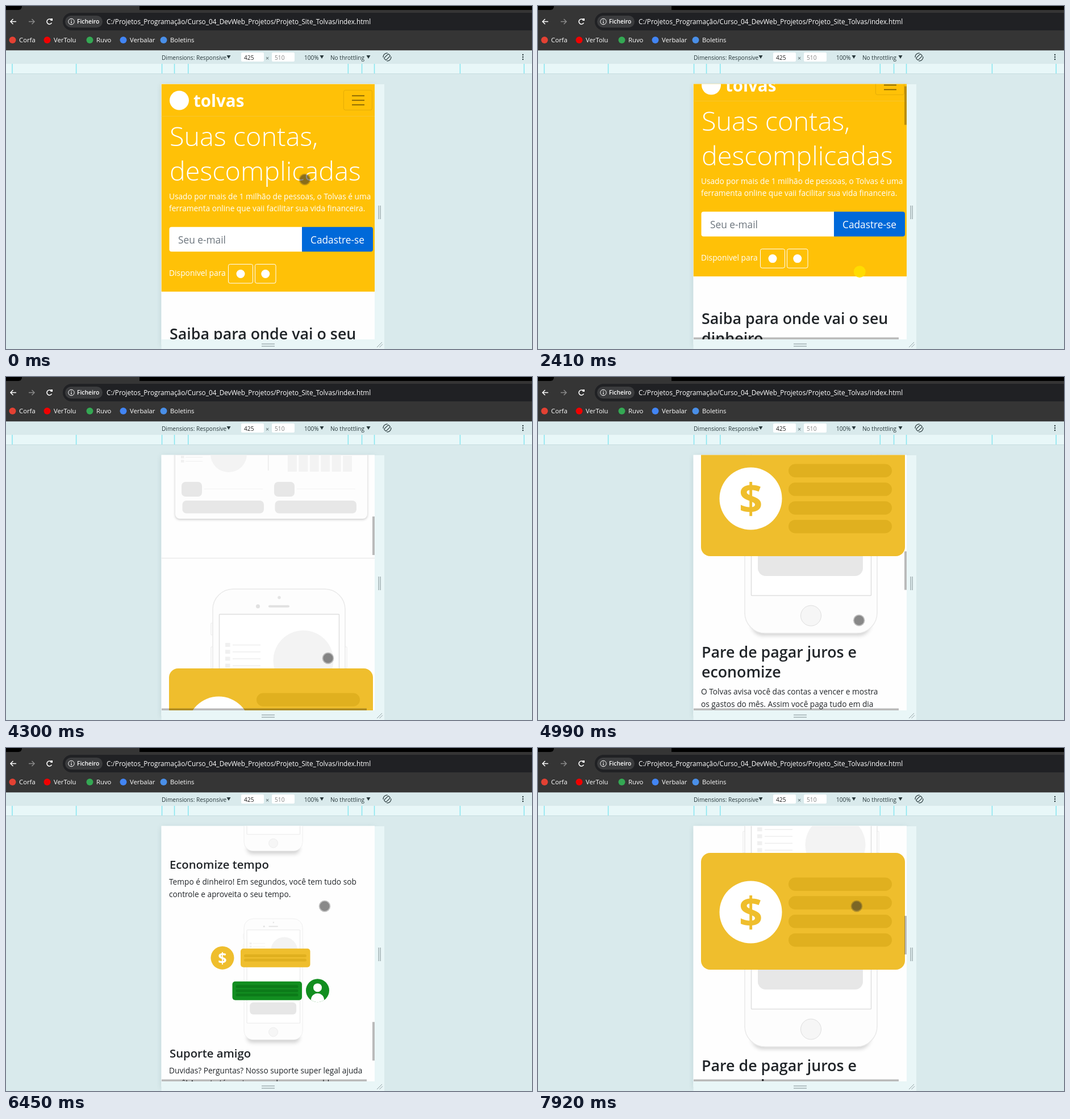
Animation, 926 px wide and 605 px high, one loop 8 s. Source, as an HTML page with a canvas:

```html
<!DOCTYPE html>
<html lang="pt">
<head>
<meta charset="utf-8">
<title>Tolvas</title>
<style>
html, body { margin: 0; width: 100%; height: 100%; overflow: hidden; }
canvas { display: block; width: 926px; height: 605px; }
</style>
</head>
<body>
<canvas id="stage" width="926" height="605"></canvas>
<script>
const ctx = document.getElementById('stage').getContext('2d');
const LOOP = 8000, TAU = Math.PI * 2;
const FAMILY = '"Open Sans", "Noto Sans", sans-serif';
const GOLD = '#efbe2d', GOLD_DARK = '#e0b01f', BLUE = '#007bff', INK = '#212529';
const VIEW = { x: 273.5, y: 137.5, w: 375.5, h: 450.5 };

// Each swipe drags the finger for DRAG ms; the page coasts until GLIDE ms.
const DRAG = 200, GLIDE = 700;
const LOW = { x: 567, y: 496 }, HIGH = { x: 561, y: 279 };
const swipe = (start, scroll, from = LOW, to = HIGH) => ({ start, scroll, from, to });
const SWIPES = [
  swipe(2340, 358), swipe(3600, 713), swipe(4380, 1120), swipe(5130, 1584), swipe(6070, 2490),
  swipe(7210, 1042, { x: 575, y: 387 }, { x: 572, y: 596 })
];

const clamp = v => Math.max(0, Math.min(1, v));
const smooth = p => p * p * (3 - 2 * p);
const accelerate = p => p * p;
const coast = p => 1 - (1 - p ** 1.6) ** 3;

const REST = { x: 526, y: 306 };
const move = (start, end, to, ease = smooth) => ({ start, end, to, ease });
const MOVES = [
  move(560, 720, { x: 526, y: 352 }), move(960, 1200, { x: 529, y: 386 }), move(1640, 2260, LOW),
  ...SWIPES.flatMap((s, i) => {
    const next = SWIPES[i + 1] || { start: LOOP, from: HIGH };
    return [
      move(s.start, s.start + DRAG, s.to, accelerate),
      move(next.start - 240, next.start - 80, next.from)
    ];
  })
];

function scrollAt(t) {
  return SWIPES.reduce((y, s) => y + (s.scroll - y) * coast(clamp((t - s.start) / GLIDE)), 0);
}
function pointerAt(t) {
  return MOVES.reduce((at, m) => {
    const e = m.ease(clamp((t - m.start) / (m.end - m.start)));
    return { x: at.x + (m.to.x - at.x) * e, y: at.y + (m.to.y - at.y) * e };
  }, REST);
}

function rect(x, y, w, h, fill) {
  ctx.fillStyle = fill;
  ctx.fillRect(x, y, w, h);
}
function round(x, y, w, h, r, fill, stroke, line = 1) {
  ctx.beginPath();
  ctx.roundRect(x, y, w, h, r);
  if (fill) { ctx.fillStyle = fill; ctx.fill(); }
  if (stroke) { ctx.strokeStyle = stroke; ctx.lineWidth = line; ctx.stroke(); }
}
function disc(x, y, r, fill, stroke) {
  ctx.beginPath();
  ctx.arc(x, y, r, 0, TAU);
  if (fill) { ctx.fillStyle = fill; ctx.fill(); }
  if (stroke) { ctx.strokeStyle = stroke; ctx.lineWidth = 1; ctx.stroke(); }
}
function path(points, color, width = 1) {
  ctx.beginPath();
  points.forEach(([x, y]) => ctx.lineTo(x, y));
  ctx.strokeStyle = color;
  ctx.lineWidth = width;
  ctx.stroke();
}
function text(s, x, y, size, fill, weight = 400, align = 'left') {
  ctx.font = `${weight} ${size}px ${FAMILY}`;
  ctx.textAlign = align;
  ctx.fillStyle = fill;
  ctx.fillText(s, x, y);
}
function lines(list, x, y, step, size, fill, weight) {
  list.forEach((s, i) => text(s, x, y + i * step, size, fill, weight));
}
function times(n, draw) {
  for (let i = 0; i < n; i++) draw(i);
}
function at(x, y, scale, draw) {
  ctx.save();
  ctx.translate(x, y);
  ctx.scale(scale, scale);
  draw();
  ctx.restore();
}
function shadowed(color, blur, dy, draw) {
  ctx.save();
  ctx.shadowColor = color;
  ctx.shadowBlur = blur;
  ctx.shadowOffsetY = dy;
  draw();
  ctx.restore();
}
function dollar(x, y, size, fill) {
  text('$', x, y + size * 0.357, size, fill, 700, 'center');
}

function navArrow(x, side, color) {
  path([[x - 5, 27.5], [x + 5, 27.5]], color, 1.5);
  path([[x + side * 0.5, 23], [x + side * 5, 27.5], [x + side * 0.5, 32]], color, 1.5);
}
function bookmark(name, x, color) {
  disc(x - 11.5, 60, 6, color);
  text(name, x, 64, 11.3, '#fff');
}

function browser() {
  rect(0, 0, 926, 78.5, '#353535');
  rect(235, 0, 691, 7, '#000');
  round(-10, -8, 38, 15, 6, '#000');
  round(100, 12, 840, 31, 15.5, '#202124');
  round(104, 17, 66, 21, 10.5, '#3b3c3e');

  navArrow(13, -1, '#fff');
  navArrow(45, 1, '#8a8a8a');
  ctx.beginPath();
  ctx.arc(76.5, 27.5, 4.5, 0.5, TAU - 0.7);
  ctx.strokeStyle = '#fff';
  ctx.lineWidth = 1.6;
  ctx.stroke();
  rect(78.5, 22, 3.5, 4, '#fff');

  disc(115, 27.5, 5.2, null, '#fff');
  rect(114.4, 24.5, 1.3, 1.4, '#fff');
  rect(114.4, 27, 1.3, 3.6, '#fff');
  text('Ficheiro', 125, 31, 10.3, '#fff', 600);
  text('C:/Projetos_Programação/Curso_04_DevWeb_Projetos/Projeto_Site_Tolvas/index.html', 177, 31.5, 11.75, '#fff');

  bookmark('Corfa', 23, '#e34133');
  bookmark('VerTolu', 84, '#f00000');
  bookmark('Ruvo', 159, '#34a853');
  bookmark('Verbalar', 218, '#4285f4');
  bookmark('Boletins', 289, '#4a8fe8');
}

function dropdown(s, x, arrowX, color) {
  text(s, x, 94.5, 10.1, color);
  ctx.beginPath();
  ctx.moveTo(arrowX - 3.5, 87);
  ctx.lineTo(arrowX + 3.5, 87);
  ctx.lineTo(arrowX, 93);
  ctx.fill();
}

function devTools() {
  const dark = '#28383b', grip = '#91a0a3';
  rect(0, 78.5, 926, 527, '#d9eaec');
  rect(0, 102, 926, 17, '#e8f7f8');
  rect(0, 119, 926, 1, '#c6dde0');
  // Common device widths, mirrored around the viewport centre
  for (const width of [320, 375, 425, 768, 1024])
    for (const side of [-1, 1]) rect(460.8 + side * width * 0.44, 102, 1.5, 17, '#86e6f0');

  dropdown('Dimensions: Responsive', 274, 392, dark);
  dropdown('100%', 525, 556, dark);
  dropdown('No throttling', 571, 638, dark);
  round(414, 82, 40, 16, 2, '#fff');
  round(468, 82, 40, 16, 2, '#fff');
  text('425', 419, 94.5, 10.2, '#222');
  text('510', 473, 94.5, 10.2, '#858585');
  text('×', 457, 95.5, 11, '#536366');

  at(671, 90, 1, () => {
    ctx.rotate(Math.PI / 4);
    round(-2.5, -5.5, 5, 11, 1, null, dark, 1.2);
    times(2, i => {
      ctx.beginPath();
      ctx.arc(0, 0, 7, i * Math.PI - 0.9, i * Math.PI + 0.9);
      ctx.stroke();
    });
  });
  times(3, i => disc(910, 86 + i * 4, 1.2, dark));

  shadowed('rgba(80,120,125,.25)', 9, 2, () => rect(VIEW.x, VIEW.y, VIEW.w, 460, '#fff'));
  rect(649, 138, 17, 467, '#e9f6f7');
  rect(VIEW.x, 588, 392.5, 17, '#e9f6f7');
  times(2, i => {
    rect(655.5 + i * 3, 352, 1.2, 24, grip);
    rect(450, 595.5 + i * 4, 23, 1.2, grip);
  });
  path([[653, 602], [662, 593]], grip);
  path([[657.5, 602], [663, 596.5]], grip);
}

function storeButton(x, w) {
  round(x, 455.5, w, 33.5, 3, null, '#fff');
  disc(x + w / 2, 472.5, 7.5, '#fff');
}

function hero() {
  rect(VIEW.x, VIEW.y, VIEW.w, 366.3, '#ffc107');
  rect(VIEW.x, 194, VIEW.w, 1, '#f7c52f');
  disc(305, 166.5, 17, '#fff');
  text('tolvas', 330, 178, 29.5, '#fff', 700);
  round(594.5, 148.5, 50, 35, 3, null, 'rgba(0,0,0,.1)');
  times(3, i => rect(609, 157.5 + i * 8, 22, 1.7, 'rgba(0,0,0,.52)'));
  lines(['Suas contas,', 'descomplicadas'], 288, 247, 61, 46.8, '#fff', 300);
  lines(['Usado por mais de 1 milhão de pessoas, o Tolvas é uma',
    'ferramenta online que vaii facilitar sua vida financeira.'], 287, 341, 21.3, 13.7, '#fff');
  round(287.5, 389.7, 234, 43.6, [4, 0, 0, 4], '#fff');
  round(521, 389.7, 125, 43.6, [0, 4, 4, 0], '#0069d9');
  text('Seu e-mail', 303, 419, 17.3, '#6c757d');
  text('Cadastre-se', 536, 418.5, 17.3, '#fff');
  text('Disponivel para', 287, 476, 13.8, '#fff');
  storeButton(391.5, 43);
  storeButton(438.5, 36.5);
}

function dashboard(x, y, scale) {
  at(x, y, scale, () => {
    shadowed('rgba(0,0,0,.22)', 4, 1.5, () => round(0, 0, 338, 206, 8, '#fdfdfd'));
    round(0, 0, 338, 24, [8, 8, 0, 0], GOLD);
    round(8, 7, 42, 9, 4.5, '#dfae2a');
    round(54, 7, 26, 9, 4.5, '#dfae2a');
    rect(0, 24, 338, 25, '#f3f3f3');
    times(5, i => {
      rect(10, 73 + i * 7.3, 5.5, 4.5, '#f0f0f0');
      rect(18, 75 + i * 7.3, 30, 1, '#efefef');
    });
    disc(94, 92, 32, '#f3f3f3');
    rect(163, 65, 1.5, 56, '#ebebeb');
    [59, 33, 50, 57, 50, 28].forEach((h, i) => rect(198 + i * 19.4, 123 - h, 16, h, '#f3f3f3'));
    times(2, i => at(i * 163, 0, 1, () => {
      round(11, 141, 36, 26, 7, '#e7e7e7');
      rect(51, 153, 103, 1, '#f3f3f3');
      round(12.5, 174, 143.5, 22.5, 7, '#e7e7e7');
    }));
  });
}

function phone(x, y, scale, overlay) {
  at(x, y, scale, () => {
    const edge = '#e9e9e9';
    round(-3, 60, 3, 21, 1, '#fff', edge);
    round(-3, 102, 239, 38, 1, '#fff', edge);
    shadowed('rgba(0,0,0,.18)', 7, 6, () => round(12, 440, 209, 40, 30, '#fff'));
    round(0, 0, 233, 482, 36, '#fdfdfd', edge, 1.5);
    disc(117, 15, 2.7, '#e4e4e4');
    disc(79.5, 30.5, 3.5, '#e1e1e1');
    round(98, 28.5, 37, 4, 2, '#e1e1e1');
    round(11.5, 44.5, 211, 371, 1, '#fff', '#dedede', 1.5);
    times(5, i => {
      rect(22, 95 + i * 12.2, 8.5, 7, '#f0f0f0');
      rect(35, 98 + i * 12.2, 49, 1.3, '#ececec');
    });
    disc(159.5, 126, 53, '#f3f3f3');
    round(23, 333, 185, 48, 14, '#e7e7e7');
    disc(116.5, 451, 18, '#f6f6f6', '#dedede');
    if (overlay) overlay();
  });
}

// Coordinates relative to the unscaled phone
function payCard() {
  round(-77, 140, 359, 206, 16, GOLD);
  disc(10.5, 244.5, 55, '#fff');
  dollar(10.5, 244.5, 73, GOLD);
  times(4, i => round(77, 183.5 + i * 32.8, 182, 23.5, 11.7, GOLD_DARK));
}

function bubble(x, y, rows, fill, stripe) {
  const step = 7.4, top = y + 14 - (rows - 1) * step / 2;
  round(x, y, 122.5, 33, 5, fill);
  times(rows, i => round(x + 6, top + i * step, 110, 5, 2.5, stripe));
}

function supportArt(y) {
  const green = '#128e20';
  phone(419, y, 0.443);
  disc(381, y + 69, 20.5, GOLD);
  dollar(381, y + 69, 27, '#fff');
  bubble(413, y + 52.5, 2, GOLD, GOLD_DARK);
  bubble(398.5, y + 110.5, 3, green, '#0c7b19');
  ctx.save();
  disc(548.5, y + 126.5, 20.5, green);
  ctx.clip();
  disc(548.5, y + 121.5, 7.5, '#fff');
  round(537, y + 131.5, 23, 30, 11.5, '#fff');
  ctx.restore();
}

function feature(phoneTop, title, body) {
  text(title, 288, phoneTop + 245, 20.3, INK, 600);
  lines(body, 287, phoneTop + 273, 22, 13.7, INK);
}

function topic(y, title, body) {
  lines(title, 288, y, 35, 26.8, INK, 600);
  lines(body, 287, y + 65, 21.6, 13.7, INK);
  round(287, y + 128, 84, 34.5, 3.5, BLUE);
  text('Veja mais', 299, y + 150.5, 13.7, '#fff');
}

function divider(y) {
  rect(VIEW.x, y, VIEW.w, 1, '#e3e3e3');
}

function page(offset) {
  ctx.save();
  ctx.beginPath();
  ctx.rect(VIEW.x, VIEW.y, VIEW.w, VIEW.h);
  ctx.clip();
  rect(VIEW.x, VIEW.y, VIEW.w, VIEW.h, '#fefefe');
  ctx.translate(0, -offset);
  hero();

  topic(588, ['Saiba para onde vai o seu', 'dinheiro'],
    ['Com o Tolvas, você categoriza todos os seus',
     'lançamentos. Com gráficos simples, você sabede onde',
     'vem e para onde vai o seu dinheiro.']);
  dashboard(298, 757, 1);
  divider(1032);

  phone(364, 1087, 1, payCard);
  topic(1612, ['Pare de pagar juros e', 'economize'],
    ['O Tolvas avisa você das contas a vencer e mostra',
     'os gastos do mês. Assim você paga tudo em dia',
     'e evita juros e multas.']);
  divider(1829);

  dashboard(301, 1905, 0.805);
  phone(505, 1887, 0.443, payCard);
  feature(1887, 'Fácil de Usar',
    ['O Tolvas vai além do básico e permite que você faça',
     'controles importantes das suas contas, de um jeito',
     'simples.']);
  phone(419, 2240, 0.443, payCard);
  feature(2240, 'Economize tempo',
    ['Tempo é dinheiro! Em segundos, você tem tudo sob',
     'controle e aproveita o seu tempo.']);
  supportArt(2573);
  feature(2573, 'Suporte amigo',
    ['Duvidas? Perguntas? Nosso suporte super legal ajuda',
     'você! A gente tá aqui pra resolver seus problemas e',
     'deixar sua vida bem mais facíl!']);
  divider(2964);

  let x = 301;
  for (const link of ['Home', 'Recursos', 'Benefícios', 'Preços']) {
    text(link, x, 3004, 13.8, '#0d83f5');
    x += ctx.measureText(link).width + 31.5;
  }
  times(4, i => {
    round(472 + i * 45, 3024.5, 37.5, 34, 3, null, '#343a40');
    disc(490.7 + i * 45, 3041.5, 7, '#343a40');
  });
  ctx.restore();
}

function scrollbars(offset, t) {
  ctx.globalAlpha = clamp((t - SWIPES[0].start) / 70);
  rect(645, 137.5 + offset / 6.57, 4, 68, 'rgba(0,0,0,.27)');
  rect(274, 584.5, 361, 3.5, 'rgba(0,0,0,.27)');
  ctx.globalAlpha = 1;
}

function pointer(t) {
  const { x, y } = pointerAt(t);
  const active = SWIPES.find(s => t >= s.start && t < s.start + DRAG);
  const press = active ? clamp((t - active.start) / 70) : 0;
  if (active) disc(x, y, 10.5, 'rgba(255,224,0,.85)');
  ctx.globalAlpha = active ? (1 - press) * 0.4 : 1;
  disc(x, y, 10.3, 'rgba(50,50,50,.3)');
  disc(x, y, 8.5, 'rgba(40,40,40,.36)');
  ctx.globalAlpha = 1;
}

function frame(now) {
  const t = now % LOOP, offset = scrollAt(t);
  browser();
  devTools();
  page(offset);
  scrollbars(offset, t);
  pointer(t);
  requestAnimationFrame(frame);
}
requestAnimationFrame(frame);
</script>
</body>
</html>
```
